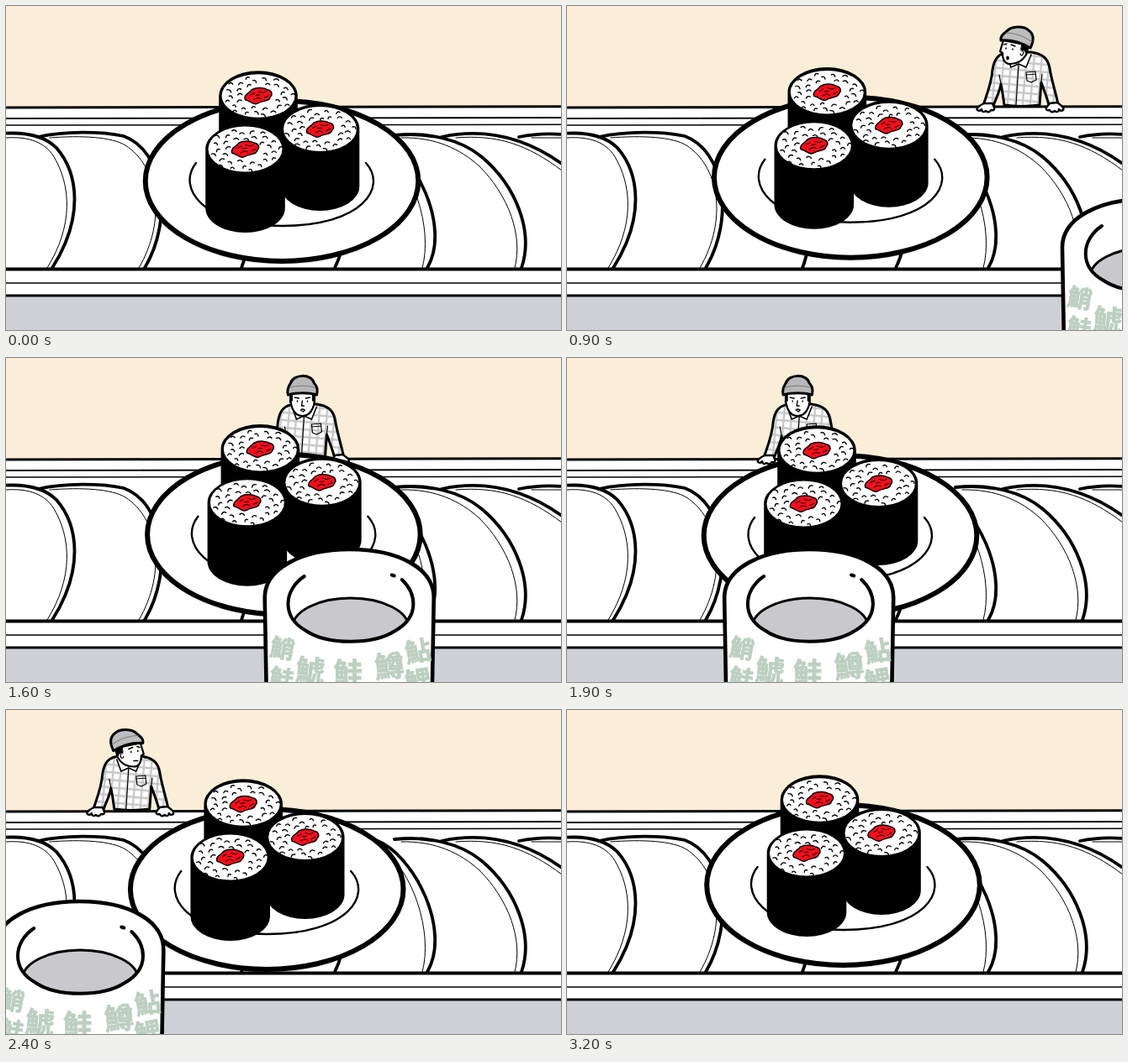
Recreate the animation shown at these times as an HTML page. Size 660 px wide and 386 px high, loop 3300 ms.

```html
<!DOCTYPE html>
<html lang="en">
<head>
<meta charset="utf-8">
<title>Sushi belt</title>
<style>
  html, body { margin: 0; width: 100%; height: 100%; overflow: hidden; background: #fff; }
  svg { display: block; width: 660px; height: 386px; }
  .ink { fill: none; stroke: #000; stroke-linecap: round; stroke-linejoin: round; }
  .kanji { font: 900 32px "Noto Sans CJK JP", "Noto Sans CJK", sans-serif; fill: #bccfc0; stroke: #bccfc0; stroke-width: .8; text-anchor: middle; }
</style>
</head>
<body>
<svg viewBox="0 0 660 386">
  <defs>
    <pattern id="plaid" width="9" height="9" patternUnits="userSpaceOnUse" patternTransform="rotate(5)">
      <rect width="9" height="9" fill="#fff"/>
      <path d="M3 0V9M0 4H9" stroke="#c6c6c6" stroke-width="2.3"/>
    </pattern>
    <clipPath id="opening">
      <path d="M47 262C25 276 20 308 50 325C75 342 130 342 156 325C186 308 181 278 160 262Z"/>
    </clipPath>
  </defs>

  <!-- room and belt -->
  <rect width="660" height="121" fill="#faeed8"/>
  <rect y="345" width="660" height="41" fill="#cfd0d5"/>
  <g class="ink">
    <path stroke-width="3" d="M0 121L660 119.800"/>
    <path stroke-width="1.8" d="M0 134L660 133"/>
    <path stroke-width="1.5" d="M0 142L660 141.300"/>
    <g stroke-width="3.8">
      <path d="M-5 152C20 150 44 153 60 169C86 199 93 252 55 312"/>
      <path d="M38 156C70 149 112 149 140 155C187 172 200 252 165 312"/>
      <path d="M286 290Q284 302 280 312M399 290Q396 302 391 312"/>
      <path d="M440 155C485 172 530 262 501 312"/>
      <path d="M462 154C500 150 540 158 566 180C606 214 628 268 613 312"/>
      <path d="M518 156C560 147 609 151 661 188"/>
      <path d="M610 156Q635 151 661 153"/>
    </g>
    <g stroke-width="1">
      <path d="M0 157C28 155 46 163 56 178C78 214 80 262 49 312"/>
      <path d="M52 157C90 154 126 156 142 166C180 190 192 254 158 312"/>
      <path d="M446 165C484 190 508 265 495 312"/>
      <path d="M470 157C510 156 540 170 563 191C598 226 615 274 605 312"/>
      <path d="M535 157C585 153 620 165 661 196M625 157H661"/>
    </g>
  </g>
  <rect y="313" width="660" height="32" fill="#fff"/>
  <g class="ink">
    <path stroke-width="3.8" d="M0 313.500H660"/>
    <path stroke-width="1.6" d="M0 330H660"/>
    <path stroke-width="3.2" d="M0 345H660"/>
  </g>

  <!-- guest -->
  <g id="guest" class="ink" stroke-width="3">
    <path fill="url(#plaid)" d="M-14 55C-27 56 -32 63 -34 76C-35 92 -41 106 -45 118L-33 119C-30 110 -26 104 -24 93L-22 104L-20 118Q0 121 22 118L23 104L24 91C27 100 31 109 33 118L44 117C41 102 36 88 34 74C32 62 25 57 12 55Z"/>
    <path stroke-width="1.2" d="M-3 70L-6 118M-24 93L-26 82M24 91L25 81M6 79L17 78L18 88L12 91L7 89ZM6 82L17 81"/>
    <path stroke-width="1.6" fill="#fff" d="M-17 59L-12 73L-3 69L6 73L12 58"/>
    <path stroke-width="2.4" fill="#fff" d="M-44 116C-49 118 -54 122 -52 124Q-49 126 -47 123Q-46 128 -42 125Q-38 128 -36 124Q-31 125 -32 121L-34 116ZM43 115C46 117 52 121 50 124Q47 126 45 123Q44 128 40 125Q36 128 34 124Q29 125 30 121L34 116Z"/>
    <g id="head">
      <g id="side">
        <path fill="#fff" stroke-width="2.2" d="M-16 41C-18 47 -19 51 -20 54L-17 56C-17 64 -14 69 -8 69C0 69 7 65 11 58L14 47Z"/>
        <path fill="#000" stroke-width="1" d="M6 46L14 49L11 57L9 53L5 52Z"/>
        <path stroke-width="1.2" d="M5 53Q9 53 7 58Q5 60 4 57"/>
        <path fill="#bdbdbd" d="M-19 41C-20 36 -16 33 -12 30C-7 24 8 23 14 29C21 34 20 42 16 50C4 43 -7 40 -19 41Z"/>
        <path stroke-width="1" stroke="#777" d="M-13 32C-3 32 9 36 18 43"/>
        <path stroke-width="1.5" d="M-15 46L-12 45M-7 46L-2 48M-13 50V51M-5 51V52"/>
        <ellipse id="gasp" cx="-11" cy="62" rx="1.8" ry="2.4" fill="#000" stroke="none"/>
        <path id="shut" stroke-width="1.5" d="M-13 62L-8 62"/>
      </g>
      <g id="turned">
        <path fill="#fff" stroke-width="2.2" d="M-15 42C-17 50 -16 58 -12 64Q-6 71 0 69C8 66 12 58 13 43Z"/>
        <path fill="#000" stroke-width="1" d="M9 43H14L12 58L10 56Z"/>
        <path fill="#b8b8b8" d="M-18 42C-19 36 -16 32 -13 29C-9 21 3 20 9 25C16 30 17 37 16 46C4 40 -8 40 -18 42Z"/>
        <path stroke-width="1" stroke="#777" d="M-15 35Q0 32 15 39"/>
        <path stroke-width="1.4" d="M-14 48H-10M-4 48L2 48M-12 52H-10M-3 52H0M-8 51L-10 58L-7 59M-9 64L-4 63"/>
      </g>
      <g id="front">
        <path fill="#fff" stroke-width="2.2" d="M-14 42C-15 54 -12 69 0 69C12 69 16 54 14 42Z"/>
        <path fill="#000" stroke-width="1" d="M-14 42L-15 53L-12 51L-12 44ZM14 42L15 53L12 51L12 44Z"/>
        <path fill="#b8b8b8" d="M-17 44C-19 37 -16 33 -14 30C-11 19 11 18 14 30C17 33 19 37 17 44C8 41 -8 41 -17 44Z"/>
        <path stroke-width="1" stroke="#777" d="M-15 35Q0 31 15 35"/>
        <path stroke-width="1.4" d="M-9 47L-4 48M4 48L9 47M-6 51V52M6 51V52M0 51L-1 57H2M-2 62Q0 60 3 62L1 64Z"/>
      </g>
    </g>
  </g>

  <!-- plate -->
  <g id="plate">
    <ellipse cx="328" cy="211" rx="164" ry="97" fill="#000" opacity=".1"/>
    <ellipse cx="328" cy="208.500" rx="162.300" ry="95.500" fill="#fff" stroke="#000" stroke-width="6"/>
    <path class="ink" stroke-width="2.4" d="M226 187C203 216 232 262 328 262C424 262 454 216 428 187"/>
    <g id="rolls"></g>
  </g>

  <!-- tea cup -->
  <g id="cup">
    <path class="ink" style="fill:#fff" stroke-width="4.6" d="M3 400L1 287C0 250 46 228 102 228C159 228 203 250 202 287L200 400Z"/>
    <g id="words" class="kanji"></g>
    <g clip-path="url(#opening)">
      <ellipse cx="103" cy="321" rx="69" ry="35" fill="#c9c9cd" stroke="#000" stroke-width="3"/>
    </g>
    <path class="ink" stroke-width="4" d="M48 260C24 276 20 308 50 325C75 342 130 342 156 325C186 308 181 280 164 264M152 258.500L155 259.500"/>
  </g>
</svg>

<script>
const $ = id => document.getElementById(id);

let seed = 11;
const rand = () => (seed = seed * 16807 % 2147483647) / 2147483647;

function rice(rx, ry) {
  let ticks = '';
  for (let i = 0; i < 36; i++) {
    const r = Math.sqrt((i + 7) / 46) + (rand() - .5) * .06, a = i * 2.4;
    const x = Math.cos(a) * r * rx, y = Math.sin(a) * r * ry;
    if (Math.abs(x) < 19 && Math.abs(y) < 12) continue;
    const turn = (rand() - .5) * 70, w = 4 + rand() * 2;
    ticks += `<path transform="translate(${x} ${y}) rotate(${turn})" d="M${-w / 2} 1q${w / 2} -3 ${w} 0"/>`;
  }
  return `<g class="ink" stroke-width="1.4">${ticks}</g>`;
}

// A roll: centre of the top, bottom edge, top radii, rim width
function roll(cx, cy, bottom, rx, ry, rim) {
  const w = rx + 3.3, low = bottom - cy - 29;
  return `<g transform="translate(${cx} ${cy})">
    <path d="M${-w} 0A${w} ${ry + rim} 0 0 1 ${w} 0V${low}A${w} 29 0 0 1 ${-w} ${low}Z"/>
    <ellipse rx="${rx}" ry="${ry}" fill="#fff"/>
    ${rice(rx, ry)}
    <g class="ink" transform="rotate(-6)">
      <path fill="#fb0d1b" stroke-width="1.5" d="M-16 3C-18 -3 -10 -4 -7 -8C0 -11 8 -9 12 -6C16 -5 18 0 14 3C13 8 4 6 -2 9C-8 11 -9 5 -16 3Z"/>
      <path stroke-width="1" d="M-9 -2L-4 -4M1 -5L6 -3L10 -4M-6 4L-1 2L3 4M7 3L12 1M-3 -1L2 -1"/>
    </g>
  </g>`;
}
$('rolls').innerHTML =
  roll(300, 107, 190, 43.5, 25.7, 4) +
  roll(373.500, 146.500, 244, 43.5, 26.5, 3.5) +
  roll(284.500, 170.500, 270, 44, 27, 2.4);

const words = [
  ['鮹', 22, 346, 10, 29], ['鯱', 55, 372, 5, 34], ['鮭', 100, 376, 0, 35],
  ['鱒', 149, 367, -5, 35], ['鮎', 183, 349, -10, 31],
  ['鮭', 21, 382, 10, 29], ['鯉', 183, 384, -10, 31]
];
$('words').innerHTML = words.map(([c, x, y, turn, size]) =>
  `<text transform="translate(${x} ${y}) rotate(${turn})" y="${size * .37}" style="font-size:${size}px">${c}</text>`).join('');

// Plate sway: time, x, y
const sway = [[300, 0, 0], [900, 9.3, -4.3], [1300, 6.3, 0], [1900, -3, 3], [2400, -17.8, 5], [2700, -7, -3.3], [3200, .5, 0]];

function slope(i, k) {
  const a = sway[i - 1], b = sway[i + 1];
  return a && b ? (b[k] - a[k]) / (b[0] - a[0]) : 0;
}
function swayAt(t, k) {
  if (t <= 300) return 0;
  const i = Math.max(0, sway.findIndex(p => p[0] >= t) - 1);
  const a = sway[i], b = sway[i + 1], d = b[0] - a[0], u = (t - a[0]) / d;
  return a[k] * (1 + 2 * u) * (1 - u) ** 2 + b[k] * u * u * (3 - 2 * u)
    + d * u * (1 - u) * (slope(i, k) * (1 - u) - slope(i + 1, k) * u);
}

const place = (id, x, y, more = '') => $(id).setAttribute('transform', `translate(${x} ${y}) ${more}`);
const show = (id, on) => $(id).style.display = on ? '' : 'none';

function draw(t) {
  const moving = t >= 300;
  place('plate', swayAt(t, 1), swayAt(t, 2));

  show('guest', moving);
  place('guest', 540 - .2608 * (t - 900), 0);
  const pose = t < 1200 || t >= 2400 ? 'side' : t < 1600 || t >= 2100 ? 'turned' : 'front';
  for (const id of ['side', 'turned', 'front']) show(id, id === pose);
  const gasp = t < 1200 || t > 2500;
  show('gasp', gasp);
  show('shut', !gasp);
  place('head', -5, t >= 2400 ? -1.5 : 0, t >= 2100 ? 'scale(-1 1)' : '');

  show('cup', moving);
  place('cup', 588 - .4018 * (t - 900), Math.abs(t - 1800) > 800 ? 2 : 0);
}

function tick(now) {
  const t = now % 3300;
  draw(t < 300 ? 0 : Math.floor(t / 100) * 100);
  requestAnimationFrame(tick);
}
draw(0);
requestAnimationFrame(tick);
</script>
</body>
</html>
```
